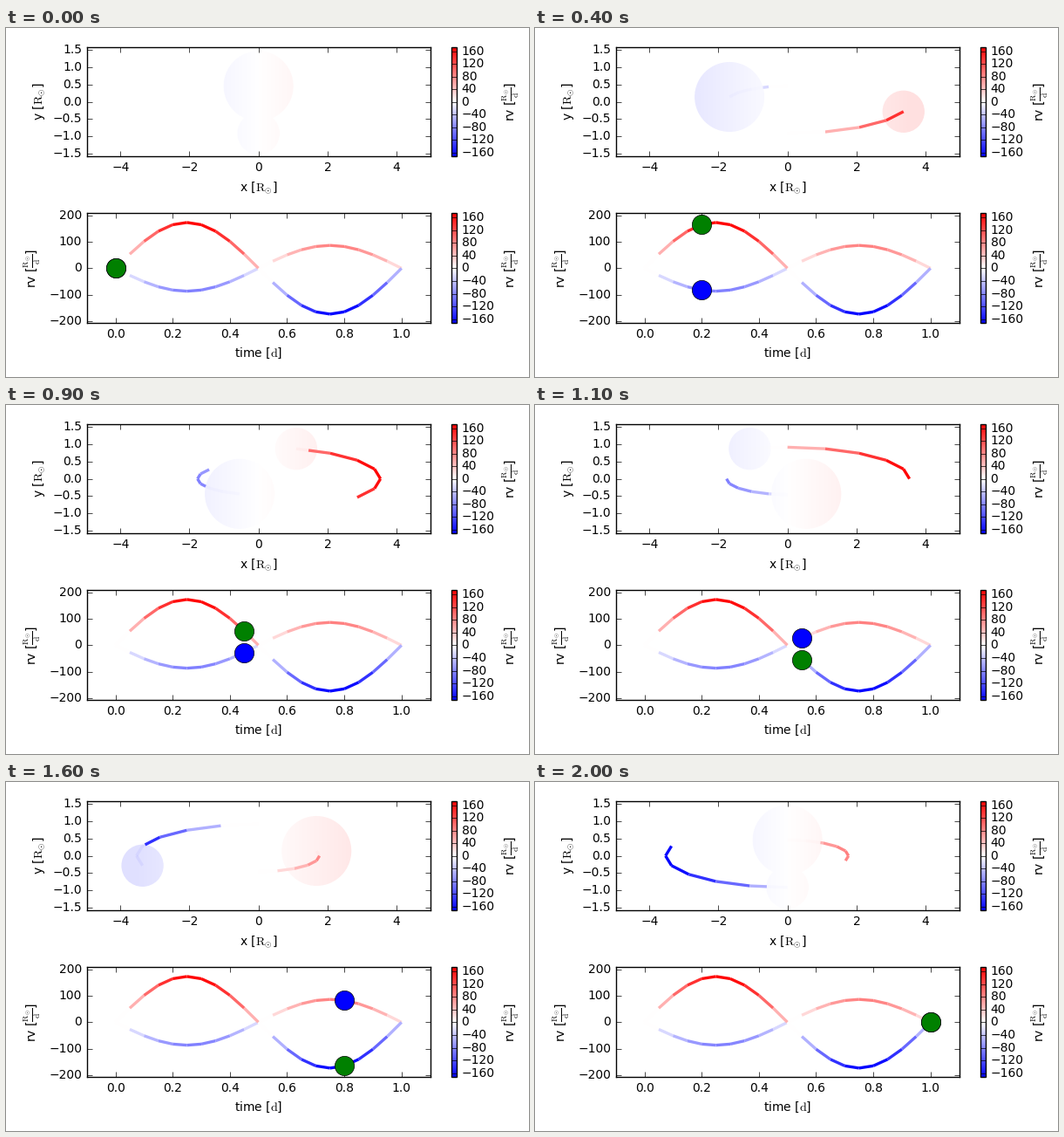
These frames come from a looping animation (600 by 400 pixels, 2.1 s). A matplotlib script:

```python
import numpy as np
import matplotlib.pyplot as plt
from matplotlib.animation import FuncAnimation
from matplotlib.cm import ScalarMappable
from matplotlib.collections import LineCollection
from matplotlib.colors import ListedColormap, Normalize
from matplotlib.patches import Circle

plt.style.use("classic")
plt.rcParams.update({"font.size": 10, "font.family": "DejaVu Sans",
                     "mathtext.fontset": "cm"})

W, H, DPI = 600, 400, 100
LEFT, RIGHT = 92.75, 486.6
SKY_ROWS, CURVE_ROWS = (22.1, 147.1), (212.4, 338.4)
STEPS, TRAIL = 20, 6            # samples per orbit, trail length in samples
INCL = np.radians(75)
ORBIT = (-5.3 / 3, 5.3 * 2 / 3)  # signed distance from the barycentre
RADIUS = (1.01, 0.61)
RV_PER_X = 2 * np.pi * np.sin(INCL) * 695700 / 86400
RV_MAX = RV_PER_X * ORBIT[1]
TINT = 0.12
COVERED_ALPHA = 0.05

norm = Normalize(-RV_MAX, RV_MAX)
bwr = plt.get_cmap("bwr")
pale = ListedColormap(1 - TINT * (1 - bwr(np.linspace(0, 1, 256))[:, :3]))


def position(star, step):
    """Sky position x, y and depth z (towards the viewer)."""
    a, th = ORBIT[star], 2 * np.pi * np.asarray(step) / STEPS
    return np.array([a * np.sin(th),
                     -a * np.cos(INCL) * np.cos(th),
                     a * np.sin(INCL) * np.cos(th)])


def pixel_axes(left, right, rows):
    top, bottom = rows
    return fig.add_axes([left / W, 1 - bottom / H,
                         (right - left) / W, (bottom - top) / H])


def rv_bar(rows):
    bar = fig.colorbar(ScalarMappable(norm, bwr),
                       cax=pixel_axes(511, 517, rows),
                       ticks=np.arange(-160, 161, 40))
    bar.set_label(RV_LABEL)


def pairs(xy):
    return np.stack([xy[:, :-1].T, xy[:, 1:].T], axis=1)


RV_LABEL = r"rv [$\mathrm{\frac{R_{\odot}}{d}}$]"
fig = plt.figure(figsize=(W / DPI, H / DPI), dpi=DPI, facecolor="white")

sky = pixel_axes(LEFT, RIGHT, SKY_ROWS)
xmax = 1.2 * (ORBIT[1] + RADIUS[1])
ymax = xmax * 125 / 394
sky.set_xlabel(r"x [$\mathrm{R_{\odot}}$]")
sky.set_ylabel(r"y [$\mathrm{R_{\odot}}$]")
rv_bar(SKY_ROWS)

curve = pixel_axes(LEFT, RIGHT, CURVE_ROWS)
curve.set_xlabel(r"time [$\mathrm{d}$]")
curve.set_ylabel(RV_LABEL)
rv_bar(CURVE_ROWS)

# Rigid rotation: radial velocity depends on x alone, so one gradient fits all.
ramp = np.linspace(-xmax, xmax, 788)[None, :] * RV_PER_X
discs, marks = [], []
steps = np.arange(STEPS + 1)
for star, color in enumerate(("blue", "green")):
    image = sky.imshow(ramp, cmap=pale, norm=norm, aspect="auto", zorder=1,
                       extent=(-xmax, xmax, -ymax, ymax))
    discs.append((image, Circle((0, 0), RADIUS[star], transform=sky.transData)))

    rv = RV_PER_X * position(star, steps)[0]
    curve.add_collection(LineCollection(
        pairs(np.array([steps / STEPS, rv])), array=rv[:-1],
        cmap=bwr, norm=norm, linewidths=2.4))
    marks += curve.plot([], [], "o", color=color, ms=16, zorder=5)

trails = sky.add_collection(LineCollection([], linewidths=2.4, zorder=3))

sky.set(xlim=(-xmax, xmax), ylim=(-ymax, ymax),
        xticks=np.arange(-4, 5, 2), yticks=np.arange(-1.5, 1.6, 0.5))
curve.set(xlim=(-0.1, 1.1), ylim=(-1.2 * RV_MAX, 1.2 * RV_MAX),
          xticks=np.arange(0, 1.1, 0.2), yticks=np.arange(-200, 201, 100))


def hidden(xy, depth, step):
    """True where a point at this depth lies behind a star's near surface."""
    mask = np.zeros(xy.shape[1], bool)
    for star, radius in enumerate(RADIUS):
        x, y, z = position(star, step)
        room = radius**2 - (xy[0] - x)**2 - (xy[1] - y)**2
        mask |= (room > 0) & (depth < z + np.sqrt(np.maximum(room, 0)))
    return mask


def trail_pieces(star, step):
    """Each segment takes depth and colour from its start, cut where covered."""
    for k in range(max(0, step - TRAIL), step):
        a, b = position(star, k), position(star, k + 1)
        xy = a[:2, None] + (b - a)[:2, None] * np.linspace(0, 1, 81)
        mask = hidden(xy, a[2], step)
        cuts = np.flatnonzero(np.diff(mask)) + 1
        ends = [0, *cuts, 80]
        for i, j in zip(ends[:-1], ends[1:]):
            if j > i:
                rgb = bwr(norm(RV_PER_X * a[0]))[:3]
                alpha = COVERED_ALPHA if mask[i] else 1
                yield a[2], xy[:, [i, j]].T, (*rgb, alpha)


def draw(step):
    pieces = []
    for star, (image, disc) in enumerate(discs):
        x, y, _ = position(star, step)
        disc.center = x, y
        image.set_clip_path(disc)
        marks[star].set_data([step / STEPS], [RV_PER_X * x])
        pieces += trail_pieces(star, step)
    pieces.sort(key=lambda p: p[0])
    trails.set_segments([p[1] for p in pieces])
    trails.set_color([p[2] for p in pieces])
    return [trails, *marks, *(image for image, _ in discs)]


anim = FuncAnimation(fig, draw, frames=STEPS + 1, interval=100,
                     repeat=True, repeat_delay=0, blit=False)
plt.show()
```
